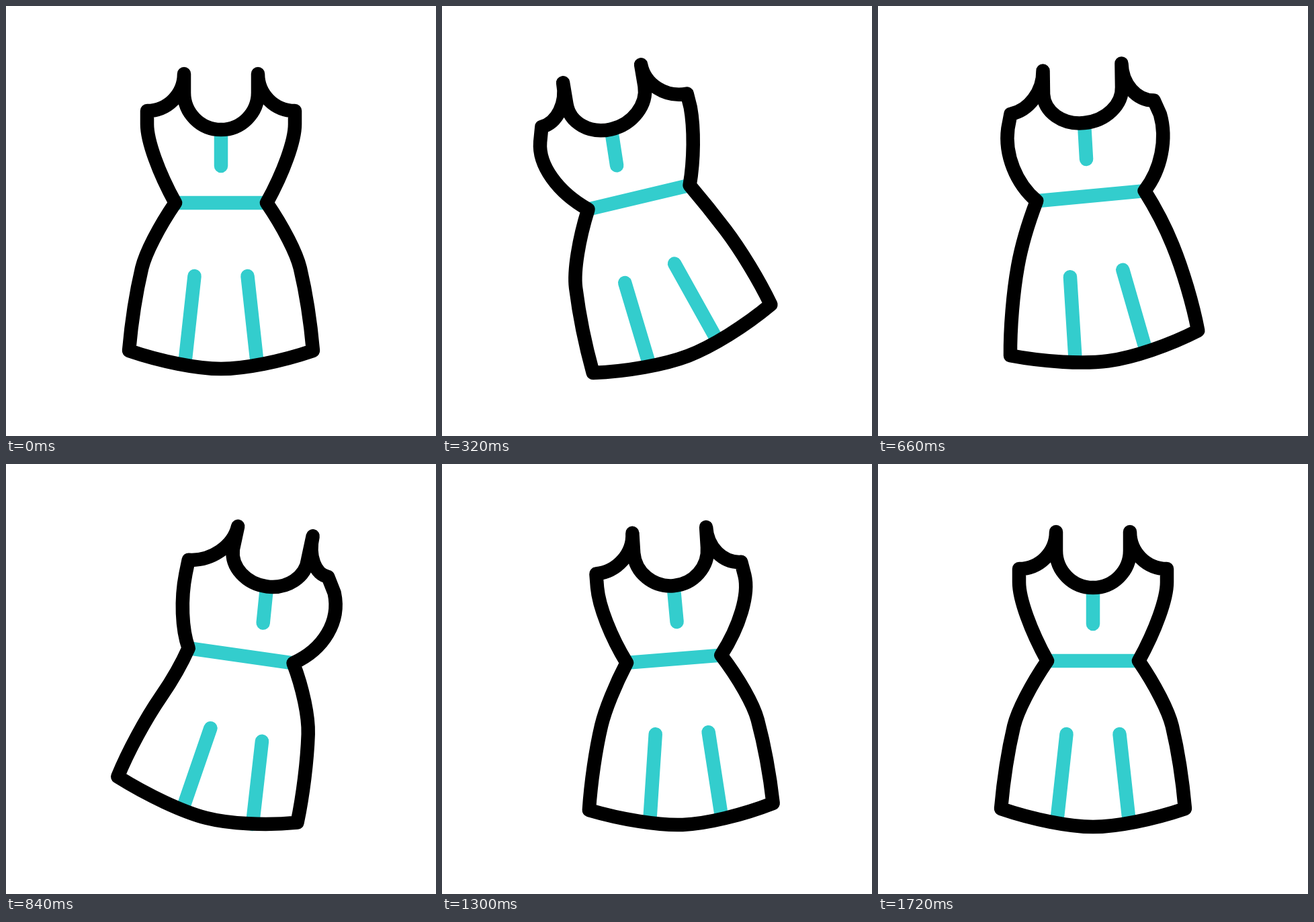
These frames come from a looping animation (640 by 640 pixels, 2400 ms). An HTML page with a canvas:

```html
<!DOCTYPE html>
<html lang="en">
<head>
<meta charset="utf-8">
<title>Swinging dress</title>
<style>
  html, body { margin: 0; width: 100%; height: 100%; overflow: hidden; background: #fff; }
  canvas { display: block; width: 100vw; height: 100vh; object-fit: contain; }
</style>
</head>
<body>
<canvas id="stage" width="640" height="640"></canvas>
<script>
const ctx = document.getElementById('stage').getContext('2d');
const LOOP = 2400, STEP = 20;

// Half of the dress, measured from the middle of the waist. A name ending in C
// is the corner a curve bends toward. In a full swing a point follows the bow of
// the body by the share `bow`, moves outward by `out` and down by `drop`.
const outline = {
  strap:     { x: 55, y: -192 },
  neck:      { x: 55, y: -164, bow: .7, drop: 6 },
  neckC:     { x: 55, y: -109, bow: .8 },
  shoulderC: { x: 55, y: -137, bow: .5 },
  shoulder:  { x: 110, y: -137, bow: -.4, out: -6, drop: 4 },
  bust:      { x: 110, y: -117, bow: .15, drop: 5 },
  waistC:    { x: 110, y: -76, out: 12, drop: 25 },
  waist:     { x: 68, y: 0, bow: 0, out: 8 },
  hipC:      { x: 109, y: 60, bow: .68, out: -8, drop: -12 },
  hemC:      { x: 131, y: 153, bow: .35 },
  hem:       { x: 137, y: 220, bow: .2 },
  bottomC:   { x: 58, y: 247 }
};
const trim = {
  dart:    { x: 39.5, y: 109, drop: 6 },
  dartEnd: { x: 53, y: 232, bow: 2.5, drop: 6 }
};
const bar = { x: 0, y: -55 };

// side: where the body bows to; shift and bow: how far at the ends and the middle.
const leftBend = { side: -1, shift: -2, bow: 35, spread: 7, bodice: .12, skirt: -.11 };
const rightBend = { side: 1, shift: 6, bow: 20, spread: 0, bodice: .12, skirt: -.025 };

const linear = t => t;
const drift = t => t ** 1.1;
const easeOut = t => Math.sin(t * Math.PI / 2);
const easeInOut = t => (1 - Math.cos(t * Math.PI)) / 2;

// Each stop: time, value, easing on the way there.
const motion = {
  angle: [[0, 0], [500, -28, drift], [1000, 19.5, easeOut], [1450, -6, easeOut], [1720, 0, easeOut]],
  x: [[0, 320], [500, 276, drift], [1000, 360, easeOut], [1720, 320, easeInOut]],
  y: [[0, 293], [500, 279.5, drift], [1000, 286, easeOut], [1720, 293, easeOut]],
  left: [[0, 0], [500, 1.03, drift], [1000, 0, easeOut]],
  right: [[500, 0], [1000, 1.2, easeOut], [1400, 0, linear]]
};

function valueAt(stops, t) {
  const i = stops.findIndex(s => s[0] > t);
  if (i === 0) return stops[0][1];
  if (i < 0) return stops[stops.length - 1][1];
  const [t0, v0] = stops[i - 1], [t1, v1, ease] = stops[i];
  return v0 + (v1 - v0) * ease((t - t0) / (t1 - t0));
}

const mix = (a, b, f) => a.map((v, i) => v + (b[i] - v) * f);

// Place of a point on one half (-1 left, 1 right, 0 middle) after bending and tilting.
function place(point, half, now, spreads) {
  const { y, bow = 1, out = 0, drop = 0 } = point;
  const x = point.x * half;
  const arch = 1 - ((y - 30) / 220) ** 2;
  let px = x, py = y;
  for (const [b, amount] of [[leftBend, now.left], [rightBend, now.right]]) {
    const spread = out + (spreads ? b.spread : 0);
    const tilt = y <= 0 ? b.bodice : b.skirt;
    px += amount * (b.side * bow * (b.shift + b.bow * arch) + half * spread);
    py += amount * (drop - b.side * tilt * x);
  }
  const a = now.angle * Math.PI / 180, c = Math.cos(a), s = Math.sin(a);
  return [now.x + px * c - py * s, now.y + px * s + py * c];
}

function poseAt(t) {
  const now = {}, p = {};
  for (const key in motion) now[key] = valueAt(motion[key], t);
  for (const [tag, half] of [['L', -1], ['R', 1]]) {
    for (const name in outline) p[name + tag] = place(outline[name], half, now, true);
    for (const name in trim) p[name + tag] = place(trim[name], half, now, false);
    p['hip' + tag] = mix(p['hipC' + tag], p['hemC' + tag], .4);
  }
  p.neckline = mix(p.neckCL, p.neckCR, .5);
  p.bottom = mix(p.bottomCL, p.bottomCR, .5);
  p.bar = place(bar, 0, now, false);
  return p;
}

function draw(t) {
  const p = poseAt(t);
  const line = (a, b) => {
    ctx.moveTo(...p[a]);
    ctx.lineTo(...p[b]);
  };
  const curve = (a, corner, b, k = .6) =>
    ctx.bezierCurveTo(...mix(p[a], p[corner], k), ...mix(p[b], p[corner], k), ...p[b]);

  ctx.fillStyle = '#fff';
  ctx.fillRect(0, 0, 640, 640);
  ctx.lineWidth = 20.5;
  ctx.lineCap = ctx.lineJoin = 'round';

  ctx.strokeStyle = '#33cdcd';
  ctx.beginPath();
  line('neckline', 'bar');
  line('waistL', 'waistR');
  line('dartL', 'dartEndL');
  line('dartR', 'dartEndR');
  ctx.stroke();

  ctx.strokeStyle = '#000';
  ctx.beginPath();
  for (const tag of ['L', 'R']) {
    const side = (a, b, k) => curve(a + tag, b + 'C' + tag, b + tag, k);
    line('neck' + tag, 'strap' + tag);
    side('strap', 'shoulder', .552);
    ctx.lineTo(...p['bust' + tag]);
    side('bust', 'waist');
    side('waist', 'hip');
    side('hip', 'hem');
    curve('hem' + tag, 'bottomC' + tag, 'bottom');
    ctx.moveTo(...p['neck' + tag]);
    curve('neck' + tag, 'neckC' + tag, 'neckline', .552);
  }
  ctx.stroke();
}

const start = performance.now();
function frame(time) {
  const t = Math.max(0, time - start) % LOOP;
  draw(Math.floor(t / STEP) * STEP);
  requestAnimationFrame(frame);
}
draw(0);
requestAnimationFrame(frame);
</script>
</body>
</html>
```
